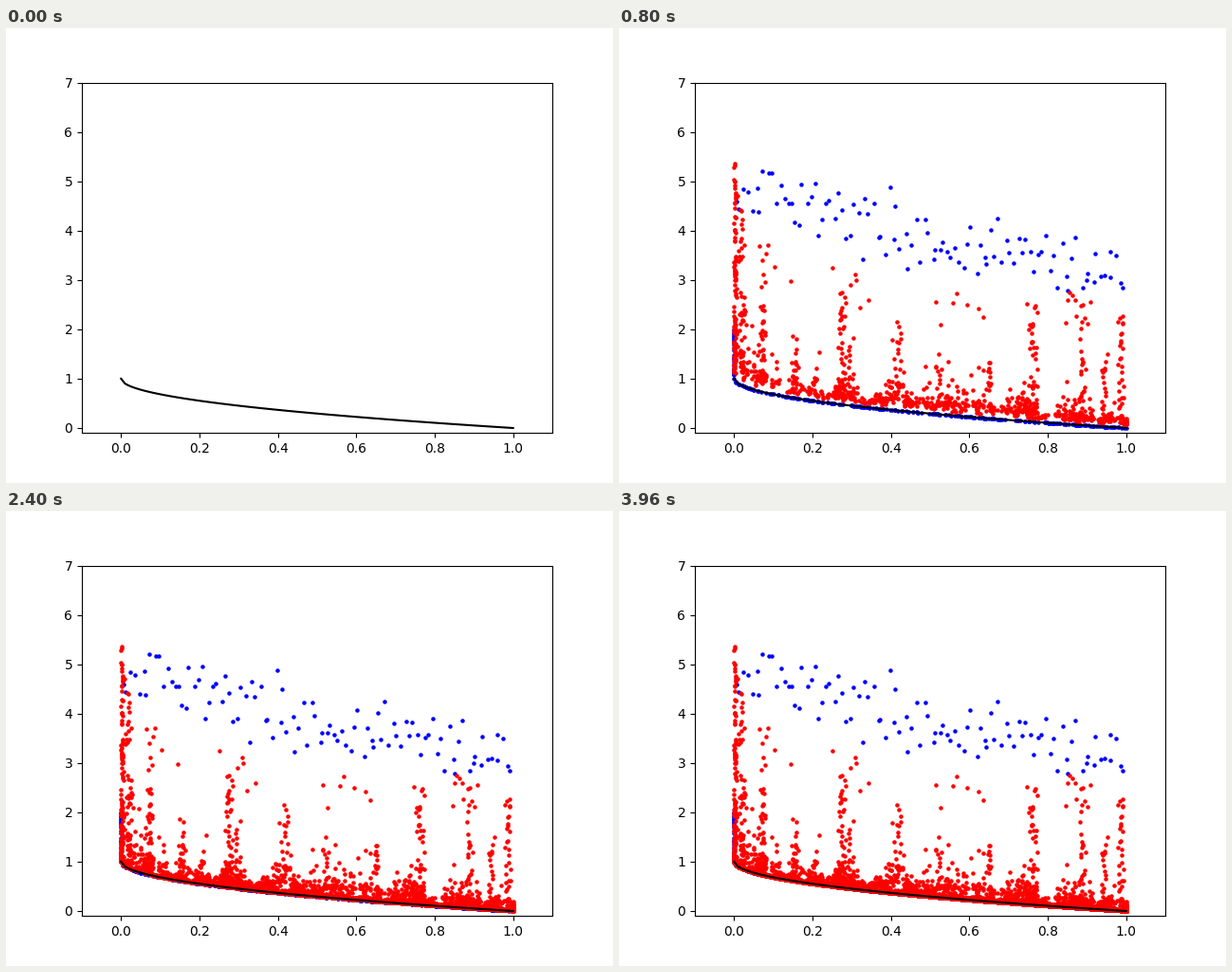
Write a matplotlib script that moves like this. It is 640x480 px and loops after 4 s.

```python
import numpy as np
import matplotlib.pyplot as plt
from matplotlib.animation import FuncAnimation

FRAMES, INTERVAL = 100, 40
EARLY_END = 12      # last frame of the coarse search
DOT = 5
rng = np.random.default_rng(7)

# Main families of red candidates: x and the height they start from.
FAMILIES = [(0, 5.4), (.004, 4.8), (.02, 4.5), (.074, 3.8), (.155, 2.0),
            (.275, 2.8), (.295, 1.9), (.418, 2.3), (.52, 1.6), (.65, 1.35),
            (.762, 2.75), (.889, 2.3), (.944, 1.6), (.987, 2.4)]


def height(x, g):
    """Second objective at x; g = 1 is the optimal front."""
    return g - np.sqrt(x * g)


def depth(x, y):
    """Inverse of height: the g that puts a point at (x, y)."""
    return ((np.sqrt(x) + np.sqrt(x + 4 * y)) / 2) ** 2


def first_samples(count=100):
    """One random sample in each slice of the x range."""
    x = (np.arange(count) + rng.random(count)) / count
    trend = np.interp(x, [0, .2, .4, .7, 1], [4.9, 4.6, 3.9, 3.65, 3.3])
    return x, trend + rng.normal(0, .38, count)


def blue_points():
    x = np.concatenate([[0, 1], rng.random(260)])
    edge = 1 + 1.1 * rng.random(24)
    parts = [first_samples(), (x, height(x, 1)), (np.zeros(24), edge)]
    return np.hstack(parts).T


def family(x0, top):
    low = height(x0, 1.25)
    count = int(14 * (top - low))
    x = np.clip(np.abs(rng.normal(x0, .001 + min(x0, .02) / 5, count)), 0, 1)
    return x, low + (top - low) * rng.random(count) ** 1.5


def haze(clumps=32, size=9):
    x = np.repeat(rng.random(clumps), size)
    x = np.clip(x + rng.normal(0, .006, x.size), 0, 1)
    return x, height(x, 1.28 + rng.exponential(.28, x.size))


def lone(count=30):
    x = rng.random(count)
    return x, rng.uniform(2, 3.7 - x)


def early_points():
    x, y = np.hstack([family(*f) for f in FAMILIES] + [haze(), lone()])
    birth = 2 + 3.4 * np.log(5 / (depth(x, y) - 1))
    birth += rng.normal(0, .5, x.size)
    return x, y, np.clip(np.round(birth), 2, EARLY_END)


def late_points(n, clumps=12, size=4):
    """Refined candidates: the gap to the front shrinks with time."""
    t = n - 15
    gap = .22 * np.exp(-t / 9) + .03 * np.exp(-t / 30)
    x = np.repeat(rng.random(clumps), size)
    x = np.clip(x + rng.normal(0, .006, x.size), 0, 1)
    x[:2] = 0, 1
    g = 1 + gap * (rng.uniform(.6, 1.3, x.size) + rng.exponential(.2, x.size))
    return x, height(x, g), np.full(x.size, n)


def red_points():
    late = [late_points(n) for n in range(EARLY_END + 1, FRAMES)]
    x, y, birth = np.hstack([early_points()] + late)
    order = np.argsort(birth, kind="stable")
    return np.column_stack([x, y])[order], birth[order]


blue_pts = blue_points()
red_pts, red_birth = red_points()

fig, ax = plt.subplots(figsize=(6.4, 4.8), dpi=100)
ax.set_xlim(-.1, 1.1)
ax.set_ylim(-.1, 7)
xs = np.linspace(0, 1, 100)
ax.plot(xs, height(xs, 1), color="black", lw=1.5)
blue = ax.scatter([], [], s=DOT, color="blue")
red = ax.scatter([], [], s=DOT, color="red")


def update(n):
    blue.set_offsets(blue_pts if n else np.empty((0, 2)))
    red.set_offsets(red_pts[:np.searchsorted(red_birth, n, side="right")])
    return blue, red


anim = FuncAnimation(fig, update, frames=FRAMES, interval=INTERVAL,
                     init_func=lambda: update(0), repeat=True, repeat_delay=0)
plt.show()
```
